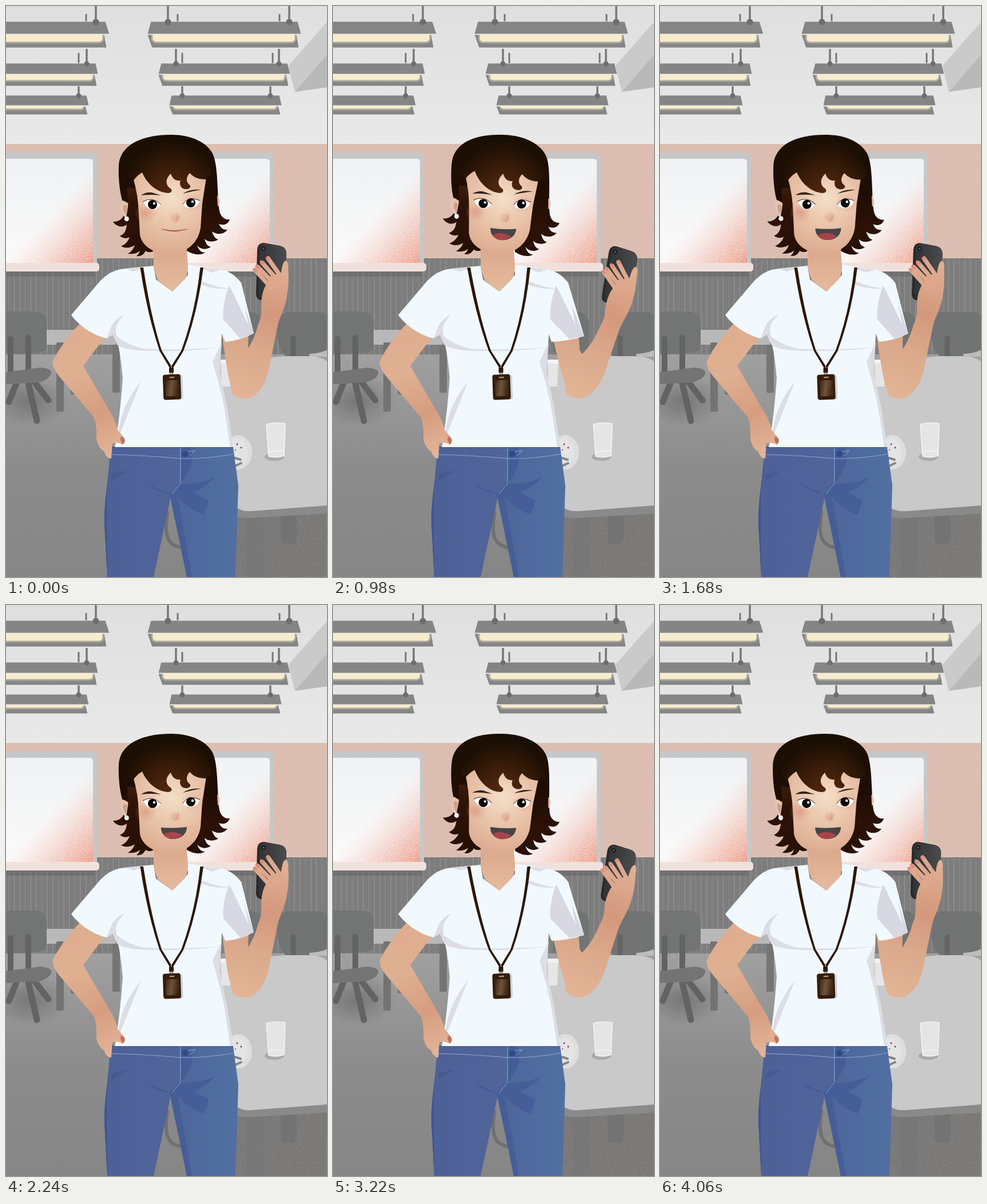
An HTML page that plays this animation: 561x998 px, repeating every 4200 ms.

```html
<!DOCTYPE html>
<html lang="en">
<head>
<meta charset="utf-8">
<title>Cafeteria talk</title>
<style>
html,body{margin:0;width:100%;height:100%;overflow:hidden;background:#e3e3e3}
svg{display:block;width:100%;height:100%}
.round{stroke-linecap:round;stroke-linejoin:round;fill:none}
</style>
</head>
<body>
<svg viewBox="0 0 561 998">
<defs>
  <linearGradient id="ceil" x2="0" y2="1"><stop stop-color="#dfdfdf"/><stop offset="1" stop-color="#e9e9e9"/></linearGradient>
  <linearGradient id="floor" x2="0" y2="1"><stop stop-color="#a0a0a0"/><stop offset=".5" stop-color="#8c8c8c"/><stop offset="1" stop-color="#868686"/></linearGradient>
  <linearGradient id="pane" x2="0" y2="1"><stop stop-color="#f0f2f3"/><stop offset="1" stop-color="#fbfafa"/></linearGradient>
  <linearGradient id="glowL" gradientUnits="userSpaceOnUse" x1="158" y1="452" x2="72" y2="368"><stop stop-color="#e5785c"/><stop offset=".4" stop-color="#ea917a" stop-opacity=".6"/><stop offset="1" stop-color="#f6c4b6" stop-opacity="0"/></linearGradient>
  <linearGradient id="glowR" href="#glowL" x1="467" x2="381"/>
  <radialGradient id="shade"><stop stop-color="#555" stop-opacity=".5"/><stop offset="1" stop-color="#555" stop-opacity="0"/></radialGradient>
  <linearGradient id="armL" gradientUnits="userSpaceOnUse" x1="110" y1="590" x2="190" y2="790"><stop stop-color="#dfae90"/><stop offset=".25" stop-color="#dfb091"/><stop offset=".62" stop-color="#d69d80"/><stop offset="1" stop-color="#e4b79b"/></linearGradient>
  <linearGradient id="armR" gradientUnits="userSpaceOnUse" x1="480" y1="450" x2="400" y2="690"><stop stop-color="#e0b094"/><stop offset=".35" stop-color="#d4987d"/><stop offset=".65" stop-color="#dbaa8c"/><stop offset="1" stop-color="#e4b597"/></linearGradient>
  <linearGradient id="neck" x2="0" y2="1"><stop stop-color="#d9a487"/><stop offset="1" stop-color="#e5bb9f"/></linearGradient>
  <radialGradient id="face" gradientUnits="userSpaceOnUse" cx="290" cy="336" r="98"><stop stop-color="#f3dfc7"/><stop offset=".4" stop-color="#ebc9af"/><stop offset="1" stop-color="#dcab8f"/></radialGradient>
  <radialGradient id="blush"><stop stop-color="#d98876" stop-opacity=".55"/><stop offset="1" stop-color="#d98876" stop-opacity="0"/></radialGradient>
  <linearGradient id="hair" gradientUnits="userSpaceOnUse" x1="0" y1="225" x2="0" y2="435"><stop stop-color="#1a0f03"/><stop offset=".5" stop-color="#1f0d04"/><stop offset=".75" stop-color="#2c1106"/><stop offset="1" stop-color="#251006"/></linearGradient>
  <radialGradient id="fringe" gradientUnits="userSpaceOnUse" cx="290" cy="328" r="88"><stop stop-color="#57290f"/><stop offset=".4" stop-color="#42200b"/><stop offset="1" stop-color="#1c0f03"/></radialGradient>
  <linearGradient id="strand" x2="0" y2="1"><stop stop-color="#3c1c09"/><stop offset="1" stop-color="#281006" stop-opacity="0"/></linearGradient>
  <linearGradient id="jeans" gradientUnits="userSpaceOnUse" x1="170" y1="0" x2="410" y2="0"><stop stop-color="#4d6097"/><stop offset=".5" stop-color="#50649a"/><stop offset=".62" stop-color="#4e689c"/><stop offset="1" stop-color="#5170a2"/></linearGradient>
  <linearGradient id="phone" x2="1"><stop stop-color="#313234"/><stop offset="1" stop-color="#4b4c4e"/></linearGradient>
  <linearGradient id="card" x2="1" y2=".2"><stop stop-color="#3b2412"/><stop offset=".5" stop-color="#6d543c"/><stop offset="1" stop-color="#402815"/></linearGradient>
  <filter id="grain" x="0" y="0" width="1" height="1" color-interpolation-filters="sRGB">
    <feTurbulence type="fractalNoise" baseFrequency=".75" numOctaves="2" seed="4"/>
    <feColorMatrix values="0 0 0 0 0 0 0 0 0 0 0 0 0 0 0 4 0 0 0 -1.5" result="n"/>
    <feComposite in="SourceGraphic" in2="n" operator="in"/>
  </filter>
  <filter id="soft" x="-.1" y="-.8" width="1.2" height="2.6"><feGaussianBlur stdDeviation="2"/></filter>
  <filter id="blur1"><feGaussianBlur stdDeviation="2.5"/></filter>
</defs>

<g id="room">
  <rect width="561" height="242" fill="url(#ceil)"/>
  <path d="M561 28L493 105L505 150L561 142Z" fill="#cacaca"/>
  <path d="M561 85L505 150L561 142Z" fill="#b9b9b9"/>
  <g id="lamps"></g>

  <rect y="241" width="561" height="201" fill="#dfc3b7"/>
  <rect y="241" width="561" height="201" fill="#c99f8e" opacity=".28" filter="url(#grain)"/>
  <rect y="441" width="561" height="169" fill="#7d7d7d"/>
  <g id="slats" stroke="#a3a3a3" stroke-width="1"></g>
  <rect y="609" width="561" height="389" fill="url(#floor)"/>

  <path d="M0 256H150Q159 256 159 265V452H0Z" fill="#c6c7c8"/>
  <path d="M0 267H146Q152 267 152 273V449H0Z" fill="url(#pane)"/>
  <rect y="280" width="152" height="169" fill="url(#glowL)" opacity=".45"/>
  <rect y="280" width="152" height="169" fill="url(#glowL)" opacity=".8" filter="url(#grain)"/>
  <rect y="464" width="155" height="9" fill="#666" opacity=".55"/>
  <rect x="-9" y="449" width="172" height="15" rx="5" fill="#f0e1dd"/>
  <path d="M300 256H459Q468 256 468 265V452H300Z" fill="#c6c7c8"/>
  <path d="M300 267H455Q461 267 461 273V449H300Z" fill="url(#pane)"/>
  <rect x="320" y="280" width="141" height="169" fill="url(#glowR)" opacity=".45"/>
  <rect x="320" y="280" width="141" height="169" fill="url(#glowR)" opacity=".8" filter="url(#grain)"/>
  <rect x="300" y="464" width="164" height="9" fill="#666" opacity=".55"/>
  <rect x="300" y="449" width="172" height="15" rx="5" fill="#f0e1dd"/>

  <ellipse cx="40" cy="690" rx="70" ry="45" fill="url(#shade)"/>
  <g fill="#757575"><rect x="113" y="585" width="13" height="94" rx="2"/><rect x="186" y="575" width="13" height="101" rx="2"/></g>
  <rect x="62" y="566" width="130" height="26" fill="#b9b9b9"/>
  <rect x="88" y="588" width="13" height="121" rx="2" fill="#737373"/>
  <path d="M0 534H50Q71 535 71 555V592Q71 605 55 606L0 609Z" fill="#737474"/>
  <g class="round" stroke="#636363" stroke-width="10"><path d="M8 582V640M39 580V640"/><path d="M20 655L5 692M38 655L54 725M48 655L74 689" stroke-width="11"/></g>
  <path d="M0 640L60 632Q82 634 79 643Q75 654 55 658L0 661Z" fill="#747474"/>

  <rect x="500" y="596" width="61" height="17" fill="#bcbcbc"/>
  <rect x="385" y="535" width="62" height="80" rx="18" fill="#727373"/>
  <path d="M492 535H548Q561 535 564 550V600Q550 607 530 608V613H490Q474 600 474 570Q474 537 492 535Z" fill="#727373"/>
  <path class="round" d="M502 580V612M412 580V612" stroke="#646464" stroke-width="9"/>
  <rect x="400" y="880" width="161" height="118" fill="#848282"/>
  <rect x="400" y="880" width="161" height="118" fill="#6c6666" opacity=".6" filter="url(#grain)"/>
  <rect x="420" y="880" width="30" height="118" fill="#777" opacity=".7"/>
  <rect x="480" y="870" width="28" height="70" rx="9" fill="#737373"/>
  <path d="M370 870H561V887L428 895Q405 897 390 885Z" fill="#8a8a8a"/>
  <path d="M365 622L490 612H525Q550 612 561 621V873L428 883Q402 884 395 865Z" fill="#c9c9c9"/>
  <path d="M375 618H394L392 665H377Z" fill="#e6e6e6"/><path d="M375 618H394V625H375Z" fill="#f3f3f3"/>
  <ellipse cx="469" cy="788" rx="17" ry="7" fill="#a9a9a9"/>
  <path d="M455 731Q472 727 488 730L486 786Q472 791 459 787Z" fill="#e5e5e5"/>
  <path d="M455 731Q472 727 488 730L486 786Q472 791 459 787ZM458 780Q472 776 486 779" fill="none" stroke="#f4f4f4" stroke-width="1.5"/>
  <ellipse cx="406" cy="780" rx="24" ry="30" fill="#dedede"/><ellipse cx="404" cy="780" rx="18" ry="24" fill="#e4e4e4"/>
  <g fill="#8c2f38"><circle cx="404" cy="766" r="1.4"/><circle cx="411" cy="772" r="1.4"/><circle cx="401" cy="776" r="1"/></g>
  <path class="round" d="M400 790L410 793M400 804L411 799" stroke="#858585" stroke-width="4"/>
  <path class="round" d="M282 885Q276 925 287 937Q292 943 304 946" stroke="#707070" stroke-width="6"/>
</g>

<path d="M183 771L177 835Q171 880 172 905L177 998H258L289 853L316 998H401L406 838L397 771Z" fill="url(#jeans)"/>
<path d="M183 785L176 850L177 998L172 905Q171 880 177 835Z" fill="#415690"/>
<path d="M305 771H322Q334 800 305 835L290 853L303 904L320 998H316L286 853L305 830Z" fill="#455d96"/>
<path d="M290 853L305 835Q340 836 366 823Q349 842 328 850L354 865L346 889Q322 882 300 858L325 998H316Z" fill="#455e97"/>
<path d="M183 820Q198 812 213 813Q198 819 186 830ZM288 853Q263 850 247 836Q273 847 288 853Z" fill="#455a90"/>
<path d="M183 784Q240 785 305 791Q350 792 398 783M305 771V834L290 853M318 779L331 777L321 787" fill="none" stroke="#91a6d2" stroke-width="1"/>
<circle cx="313" cy="783" r="5.5" fill="#304b84"/><path d="M183 771H397" stroke="#3d5490" stroke-width="2"/>

<path d="M129 555Q98 588 82 620Q79 632 97 652L153 718Q159 730 158 757Q162 774 171 778Q176 791 184 791L186 762L196 740L187 718L135 629L163 592L178 575Z" fill="url(#armL)"/>

<g id="upper"><path d="M378 575L424 568L423 605L438 640L428 686L397 680Q386 645 378 575Z" fill="url(#armR)"/></g>
<g id="fore">
  <path d="M439 428Q439 414 451 414L478 419Q491 421 490 436L485 500Q483 514 470 514H446Q437 513 437 503Z" fill="#29292b"/>
  <path d="M443 427Q443 415 453 415L479 420Q491 422 490 436L485 500Q483 513 470 513H452Q441 511 441 501Z" fill="url(#phone)"/>
  <circle cx="450" cy="424" r="3.8" fill="#1c1c1e"/><circle cx="450" cy="424" r="1.6" fill="#66676c"/>
  <path d="M481 466Q483 447 489 445Q494 446 493 460Q495 485 491 508C487 530 477 545 474 562L460 632Q453 667 434 681Q416 692 397 680L387 640L418 606Q434 584 441 556Q448 540 446 526Q446 505 452 492L462 472Z" fill="url(#armR)"/>
  <path class="round" d="M481 474L458 441M476 481L448 449M471 488L440 456M463 492L435 461" stroke="#dda88d" stroke-width="7.5"/>
  <path class="round" d="M459 442L457 440M449 450L446 447M441 457L438 454M436 462L434 460" stroke="#da8e7f" stroke-width="5"/>
</g>

<path d="M237 456L200 460Q182 463 165 480L114 540C126 557 150 575 176 581L190 566Q200 602 204 650Q199 720 190 771H397L386 700L373 640L378 560L412 485Q395 463 375 461L344 456L318 452V470L291 499L262 478L258 454Z" fill="#f1f9fe"/>
<path id="sleeve" fill="#f1f9fe"/>
<path id="fold" fill="#d7d8e1"/>
<g fill="#dcdde5">
  <path d="M208 538Q190 547 184 560L176 581L193 571Q188 558 208 538Z"/>
  <path d="M190 771L236 656Q205 695 199 731Z"/>
  <path d="M377 588L361 622Q374 665 381 700L392 771H397L386 700L373 640Z"/>
  <path d="M183 565Q200 589 240 599Q300 602 376 597Q300 606 236 602Q208 601 194 592Z"/>
  <path d="M336 485Q360 496 392 494Q365 491 345 482ZM206 459L222 464L237 460V456ZM344 457L375 461L360 466L344 460Z"/>
</g>
<path d="M183 716L190 735L206 754Q211 762 204 767Q195 761 184 765Z" fill="url(#armL)"/>
<path d="M204 766Q209 763 207 756L202 752Q197 758 204 766Z" fill="#bd7563"/>

<g class="head">
  <path d="M289 225C328 225 358 242 364 266C371 290 369 335 373 358C375 369 383 374 391 373C388 382 380 384 372 381C376 390 381 391 387 391C380 400 368 400 360 394C363 404 367 407 371 408C362 414 352 412 347 407C349 416 353 420 358 421C348 428 338 424 334 418C337 428 342 431 348 431C338 437 326 434 316 428V390H250L257 429Q249 432 244 428C240 436 234 438 228 437Q233 433 234 428C228 433 220 434 213 433C220 429 223 424 225 418C218 423 208 424 201 420C208 417 213 412 216 404C210 407 204 406 199 402C206 399 210 394 211 382C204 388 193 386 187 377C196 378 205 372 207 362L207 348C199 335 196 300 197 280C198 246 232 225 289 225Z" fill="url(#hair)"/>
</g>
<path d="M258 405V454Q261 471 266 480L291 499L313 477Q318 470 318 452L314 405Z" fill="url(#neck)"/>
<g class="head">
  <path d="M207 341Q199 337 200 352Q202 366 210 371L214 345Z" fill="#e5c3ad"/><path d="M206 347Q202 356 210 365L212 350Z" fill="#c9a18d"/>
  <path d="M369 331Q375 336 373 345Q372 350 370 350Z" fill="#e5bda5"/>
  <circle cx="211" cy="372" r="4.3" fill="#eef2f5"/>
  <path d="M212 318L230 318L236 402Q222 400 214 374Z" fill="url(#strand)"/>
  <path d="M230 283L222 300Q231 330 232 362L234 400C238 421 259 433 287 433C315 433 336 414 340 388L343 345L350 300L340 280Z" fill="url(#face)"/>
  <ellipse cx="244" cy="362" rx="19" ry="18" fill="url(#blush)"/>
  <ellipse cx="326" cy="343" rx="20" ry="17" fill="url(#blush)" opacity=".6"/>
  <path d="M212 298L222 306Q229 296 238 291C248 314 266 326 283 327C290 327 292 321 286 318C278 312 279 301 288 293C291 303 298 306 305 305C302 312 306 320 314 320C321 321 325 315 320 312C314 307 315 298 321 292Q332 304 349 303L360 296C356 252 330 238 285 238C240 238 212 260 212 298Z" fill="url(#fringe)"/>
  <path d="M236 331Q244 325 255 326L271 331Q250 329 236 331ZM309 328Q322 319 341 321Q328 323 309 328Z" fill="#33231a"/>
  <path d="M240 343Q256 332 271 347Q264 356 255 356Q246 354 240 343ZM309 347Q318 331 338 341Q335 352 323 353Q314 353 309 347Z" fill="#fff"/>
  <path d="M239 342Q256 332 271 347M309 347Q318 331 339 340" fill="none" stroke="#493228"/>
  <circle cx="256" cy="347" r="8" fill="#0b0908"/><circle cx="323" cy="344" r="8" fill="#0b0908"/>
  <circle cx="259" cy="345" r="2.2" fill="#fff"/><circle cx="326" cy="342" r="2.2" fill="#fff"/>
  <ellipse cx="296" cy="370" rx="8" ry="7" fill="#d99f85" opacity=".5" filter="url(#blur1)"/>
  <path d="M299 360Q304 370 301 375Q297 378 293 376Q301 372 299 360Z" fill="#d9967c" opacity=".55"/>
  <path id="shut" d="M272 390Q295 395 317 390Q304 393 296 394Q284 394 272 390Z" fill="#a55a47" stroke="#a55a47" stroke-width=".9"/>
  <g id="open">
    <path d="M271 389Q294 391 316 388C316 402 304 409 292 409C280 409 271 401 271 389Z" fill="#484445"/>
    <path d="M275 401Q290 392 308 402Q301 409 291 409Q281 409 275 401Z" fill="#a6444b"/>
  </g>
</g>

<path id="strap" d="M234.500 457H240Q253 543 272 602L290 631L287 634L268.500 603Q247 540 234.500 457ZM345 457H339.500Q331 535 306.500 602L288 631L291 634L310 603Q334 540 345 457Z" fill="#2c1708"/>
<g id="badge">
  <rect x="285" y="632" width="8" height="9" rx="1" fill="#2c1708"/>
  <path d="M289 640L285 647H294Z" fill="none" stroke="#6d563f" stroke-width="1.5"/>
  <g transform="rotate(-2 290 665)">
    <rect x="277" y="645" width="32" height="43" rx="4" fill="#ced3da"/>
    <rect x="274.500" y="644" width="31" height="44" rx="4" fill="#351b0a"/>
    <rect x="279" y="654" width="23" height="28" rx="4" fill="url(#card)"/>
    <rect x="286" y="648" width="9" height="2.500" rx="1" fill="#a28e7a"/>
  </g>
</g>
</svg>
<script>
const $ = id => document.getElementById(id);

// Each lamp: left top, right top, y, bar height, total height, end slant
const lamps = [[-20,174,27,22,46,7], [253,510,27,22,46,6], [-20,157,100,19,40,4],
  [271,492,100,19,40,5], [-20,141,156,18,34,4], [289,478,156,18,34,4]];
// Rods: x, top, bottom, knob
const rods = [[157,0,28,1],[140,14,27,0],[283,0,28,1],[300,14,27,0],[495,0,28,1],[478,14,27,0],
  [141,75,101,1],[127,82,101,0],[297,75,101,1],[308,82,101,0],[477,75,101,1],[466,82,101,0],
  [127,140,157,1],[308,140,157,1],[462,140,157,1]];

$('lamps').innerHTML = rods.map(([x, a, b, knob]) =>
  `<path d="M${x} ${a}V${b}" stroke="#777" stroke-width="${knob ? 3.5 : 3}"/>`).join('') +
  lamps.map(([l, r, y, bar, all, s]) => {
    const m = y + bar, end = y + all, tube = all - bar - 13;
    return `<path d="M${l - s} ${m + 1}H${r - 2}L${r + 2} ${end}H${l + 2}Z" fill="#858585" stroke="#eee" stroke-width=".8"/>
      <rect x="${l + 3}" y="${m - 3}" width="${r - l - 8}" height="${tube + 6}" rx="5" fill="#fff4d4" filter="url(#soft)"/>
      <rect x="${l + 4}" y="${m - 4}" width="${r - l - 10}" height="${tube + 6}" rx="5" fill="#f8ecce"/>
      <path d="M${l} ${y}H${r}L${r + s} ${m}H${l - s}Z" fill="#858585" stroke="#eee" stroke-width=".8"/>`;
  }).join('') +
  rods.filter(r => r[3]).map(([x, , b]) => `<circle cx="${x}" cy="${b}" r="${b < 50 ? 5.5 : 4.5}" fill="#6d6d6d"/>`).join('');

let slats = '';
for (let x = 5, i = 0; x < 561; x += 9.6, i++) slats += `<path d="M${x} 442V609" opacity="${i % 3 ? .75 : .4}"/>`;
$('slats').innerHTML = slats;

const STEP = 140, LOOP = 4200, SECOND = 2300;
const lean = [[0,0],[140,.25],[280,.62],[420,.9],[500,1],[1300,1],[1400,.74],[1540,.38],[1700,.08],[1800,0]];
const wave = [[0,0],[420,0],[500,.1],[700,.42],[850,.8],[980,1],[1120,.67],[1340,.4],[1400,.33],[1600,.12],[1800,0]];
const talk = [[280,560],[840,1120],[1680,1960],[2240,2660],[3080,3360],[3500,4200]];

function at(keys, t) {
  const i = keys.findIndex(k => k[0] > t);
  if (i < 0) return keys[keys.length - 1][1];
  if (i === 0) return keys[0][1];
  const [a, u] = keys[i - 1], [b, v] = keys[i];
  return u + (v - u) * (t - a) / (b - a);
}
const move = (el, value) => el.setAttribute('transform', value);
const heads = document.querySelectorAll('.head');

function draw(t) {
  const p = t < 2240 ? t : Math.max(0, t - SECOND);
  const h = at(lean, p), w = at(wave, p), swing = 4.5 * h;
  heads.forEach(el => move(el, `rotate(${3.3 * h} 290 460)`));
  move($('upper'), `rotate(${-5.6 * h} 385 520)`);
  move($('fore'), `translate(${14 * h} ${-2 * h}) rotate(${7.5 * w} 405 650)`);
  const x = 433 + 6 * h, y = 572 + 5 * h;
  $('sleeve').setAttribute('d', `M375 461Q400 466 412 487L${x} ${y}Q410 ${585 + h} ${383 - h} 587L372 560Z`);
  $('fold').setAttribute('d', `M390 488Q377 525 380 548L${410 + 3 * h} 582L${x} ${y}L416 520L424 558Z`);
  move($('strap'), `translate(${-swing * 458 / 174} 0) matrix(1 0 ${swing / 174} 1 0 0)`);
  move($('badge'), `translate(${swing} 0)`);
  const open = talk.some(([a, b]) => t >= a && t < b);
  $('open').style.display = open ? '' : 'none';
  $('shut').style.display = open ? 'none' : '';
}

const start = performance.now();
let last = -1;
function tick(now) {
  const t = Math.floor(Math.max(0, now - start) % LOOP / STEP) * STEP;
  if (t !== last) draw(last = t);
  requestAnimationFrame(tick);
}
draw(0);
requestAnimationFrame(tick);
</script>
</body>
</html>
```
